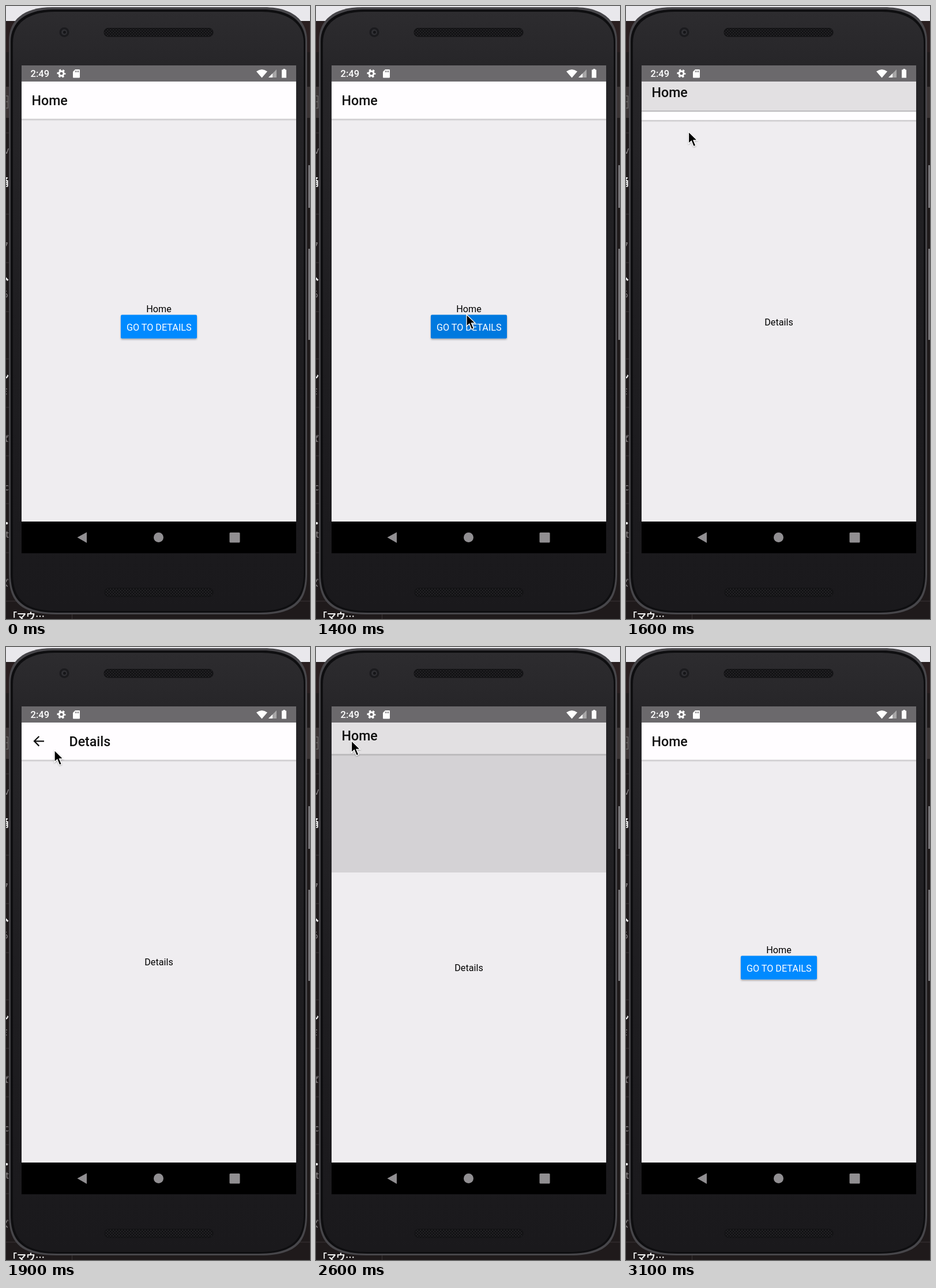
Animation, 527 px wide and 1063 px high, one loop 3500 ms. Source, as an HTML page:

```html
<!DOCTYPE html>
<html lang="en">
<head>
<meta charset="utf-8">
<title>Stack navigation</title>
<style>
html, body { margin: 0; width: 100%; height: 100%; overflow: hidden; background: #1d191a; }
svg { display: block; width: 527px; height: 1063px; font: 16.2px Roboto, sans-serif; }
.title { font-size: 23.2px; font-weight: 500; fill: #111; }
.mid { text-anchor: middle; }
.behind { font-family: "Noto Sans CJK JP", "Noto Sans CJK", sans-serif; fill: #8d898a; }
</style>
</head>
<body>
<svg viewBox="0 0 527 1063">
  <defs>
    <linearGradient id="body" x2="0" y2="1">
      <stop stop-color="#2d2c2f"/><stop offset=".1" stop-color="#262528"/>
      <stop offset=".5" stop-color="#1f1e21"/><stop offset="1" stop-color="#1a191c"/>
    </linearGradient>
    <linearGradient id="shade" x2="0" y2="1">
      <stop stop-color="#000" stop-opacity=".2"/><stop offset="1" stop-color="#000" stop-opacity="0"/>
    </linearGradient>
    <pattern id="mesh" width="5" height="5" patternUnits="userSpaceOnUse">
      <rect width="5" height="5" fill="#121214"/>
      <circle cx="1.2" cy="1.2" r="1" fill="#2c2b2e"/><circle cx="3.7" cy="3.7" r="1" fill="#2c2b2e"/>
    </pattern>
    <filter id="lift" x="-10%" y="-20%" width="120%" height="150%">
      <feDropShadow dx="0" dy="1.8" stdDeviation="1.6" flood-opacity=".32"/>
    </filter>
    <filter id="soft" x="-30%" y="-20%" width="170%" height="150%">
      <feDropShadow dx="0" dy="1" stdDeviation="1" flood-opacity=".35"/>
    </filter>
    <clipPath id="view"><rect x="27" y="131" width="476" height="763"/></clipPath>
    <clipPath id="wipe"><rect id="wipeBox" x="27" y="131" width="476" height="763"/></clipPath>
    <clipPath id="key"><rect x="199" y="535.5" width="132" height="41" rx="2"/></clipPath>
    <g id="page">
      <rect x="27" y="131" width="476" height="763" fill="#efedf0"/>
      <rect x="27" y="195.5" width="476" height="4" fill="url(#shade)"/>
      <rect x="27" y="131" width="476" height="64.5" fill="#fffdff"/>
    </g>
  </defs>

  <!-- desktop behind the phone -->
  <rect width="527" height="1063" fill="#1f1a1b"/>
  <rect width="527" height="26" fill="#e9e8ec"/>
  <path d="M0 27H527V80H0z" fill="#2a1f20"/>
  <path d="M0 140H5V194H0zM522 140H527V194H522z" fill="#3b3535"/>
  <path d="M0 156H4M0 166H4M0 177H4M3.500 156V177" stroke="#777"/>
  <path d="M0 220H6M0 361H6M0 445H6M0 530H6M0 612H6M0 696H6M0 780H6M0 863H6M0 948H6M0 1032H527M114.500 1055V1063" stroke="#3a3536"/>
  <path d="M524 276H527V350H524zM524 421H527V579H524z" fill="#79777a"/>
  <g id="scraps" class="behind"></g>
  <text class="behind" x="3" y="1064" font-size="16" font-weight="700" style="fill:#eee">「マウ…</text>

  <!-- phone -->
  <path d="M5 60C5 25 30 2 80 2H447C497 2 522 25 522 60V985C522 1030 505 1055 440 1055H87C22 1055 5 1030 5 985z" fill="#47464a"/>
  <path d="M8 62C8 28 34 6 82 6H445C493 6 519 28 519 62V984C519 1027 502 1052 438 1052H89C25 1052 8 1027 8 984z" fill="#0e0e10"/>
  <path d="M12 64C12 31 37 10 84 10H443C490 10 516 31 516 64V982C516 1024 500 1049 437 1049H90C27 1049 12 1024 12 982z" fill="url(#body)"/>
  <rect x="170" y="38.500" width="189" height="14.500" rx="7" fill="url(#mesh)" stroke="#111113"/>
  <rect x="171" y="1009.500" width="188" height="14.500" rx="7" fill="url(#mesh)" stroke="#111113"/>
  <circle cx="101" cy="45.500" r="8.500" fill="#1b1b1e"/>
  <circle cx="101" cy="45.500" r="5" fill="#303034"/><circle cx="101.500" cy="45.500" r="2.500" fill="#151518"/>

  <!-- status and navigation bars -->
  <rect x="27" y="103" width="476" height="28" fill="#6b696c"/>
  <g fill="#fff">
    <text x="42.500" y="123" font-size="16.500" font-weight="500">2:49</text>
    <circle cx="96" cy="117" r="4" fill="none" stroke="#fff" stroke-width="3"/>
    <circle cx="96" cy="117" r="6.200" fill="none" stroke="#fff" stroke-width="2.600" stroke-dasharray="3.250 3.243" stroke-dashoffset="1.600"/>
    <path d="M120 110H127Q128 110 128 111V123.500Q128 124.500 127 124.500H117Q116 124.500 116 123.500V114z"/>
    <path d="M120.500 112V115M123 112V115M125.500 112V115" stroke="#6b696c" stroke-width="1.200"/>
    <path d="M434 113.500Q443.500 106.500 453 113.500L443.500 124.500z"/>
    <path d="M469 110V124H455z" opacity=".4"/><path d="M462 117V124H455z"/>
    <path d="M480.500 109H484V110.500H486V124.500H478V110.500H480.500z"/>
  </g>
  <rect x="27" y="894" width="476" height="55"/>
  <g fill="#918f92">
    <path d="M123.500 921.500L140 912.500V931z"/>
    <circle cx="264.500" cy="921.500" r="8.500"/>
    <rect x="387.500" y="913" width="18" height="17.500" rx="1.500"/>
  </g>

  <!-- app -->
  <g clip-path="url(#view)">
    <g id="home">
      <use href="#page"/>
      <text class="title" x="44.500" y="172">Home</text>
      <text class="mid" x="265" y="531">Home</text>
      <rect x="199" y="535.500" width="132" height="41" rx="2" fill="#008aff" filter="url(#lift)"/>
      <circle id="press" cx="289" cy="552" clip-path="url(#key)"/>
      <text class="mid" x="265.300" y="562.500" fill="#fff">GO TO DETAILS</text>
    </g>
    <rect id="dim" x="27" y="131" width="476" height="763"/>
    <g clip-path="url(#wipe)">
      <g id="details">
        <use href="#page"/>
        <circle id="tap" cx="57" cy="163" r="30"/>
        <path d="M66 163.300H49.500M57.300 155L49 163.300L57.300 171.600" fill="none" stroke="#111" stroke-width="2.300"/>
        <text class="title" x="109.500" y="172">Details</text>
        <text class="mid" x="265" y="551.500">Details</text>
      </g>
    </g>
  </g>
  <path id="mouse" d="M0 0V20.500L4.800 16.200L8.600 25.500L12.400 24L8.500 14.800H15z" stroke="#fff" stroke-width="1.300" filter="url(#soft)"/>
</svg>

<script>
const $ = id => document.getElementById(id);
const set = (id, attrs) => { for (const k in attrs) $(id).setAttribute(k, attrs[k]); };
const clamp = v => Math.min(1, Math.max(0, v));
const LOOP = 3500, STEP = 100, SLIDE = 425, TOP = 131, HEIGHT = 763;
const OPEN = 1412, CLOSE = 2532;

// fragments of text at the desktop's left edge: glyph, baseline, size, bold
const scraps = [["v", 256, 16], ["涌", 312, 18, 1], ["ク", 421, 16], ["へ", 477, 18, 1], ["る", 505, 15],
  ["ん", 645, 18, 1], ["ミ", 673, 15], ["ば", 756, 15], ["c", 840, 15], [".", 899, 22, 1], ["t", 922, 15], ["ズ", 1006, 15]];
$("scraps").innerHTML = scraps.map(([s, y, size, bold]) =>
  `<text x="5" y="${y}" text-anchor="end" font-size="${size}"${bold ? ' font-weight="700" fill="#eee" style="fill:#eee"' : ""}>${s}</text>`).join("");

const bezier = (a, b, c, d, u) => {
  const v = 1 - u;
  return v * v * v * a + 3 * v * v * u * b + 3 * v * u * u * c + u * u * u * d;
};

// fast out, extra slow in: two joined curves
function ease(x) {
  if (x <= 0 || x >= 1) return clamp(x);
  const [xs, ys] = x < 1 / 6 ? [[0, .05, .1333, 1 / 6], [0, 0, .06, .4]] : [[1 / 6, .2083, .25, 1], [.4, .82, 1, 1]];
  let lo = 0, hi = 1;
  for (let i = 0; i < 24; i++) {
    const m = (lo + hi) / 2;
    if (bezier(...xs, m) < x) lo = m; else hi = m;
  }
  return bezier(...ys, lo);
}

// pointer path: time, x, y
const path = [[100, 378, 726], [200, 312, 692], [300, 250, 645], [400, 230, 598], [500, 262, 566], [600, 287, 550.5],
  [1300, 287, 550.5], [1400, 261, 535], [1500, 180, 385], [1600, 108.5, 218], [1700, 91, 187], [1900, 84, 179],
  [2000, 61.5, 162.5], [3000, 61.5, 162.5]];

function pointer(t) {
  const i = path.findIndex(p => p[0] >= t);
  if (i < 0 || t < path[0][0]) return null;
  const b = path[i], a = path[i - 1] || b, k = i ? (t - a[0]) / (b[0] - a[0]) : 0;
  return [a[1] + (b[1] - a[1]) * k, a[2] + (b[2] - a[2]) * k];
}

function draw(t) {
  const closing = t >= CLOSE;
  const x = clamp((t - (closing ? CLOSE : OPEN)) / SLIDE);
  const shown = closing ? 1 - ease(x) : ease(x);
  const drop = .041 * HEIGHT * (1 - shown);
  const cut = .959 * HEIGHT * (1 - shown) + drop;
  const dim = closing ? 1 - x * x : clamp((t - OPEN) / 117);

  set("home", { transform: `translate(0 ${-.02 * HEIGHT * shown})` });
  set("details", { transform: `translate(0 ${drop})` });
  set("wipeBox", { y: TOP + cut, height: Math.max(0, HEIGHT - cut) });
  set("dim", { opacity: .115 * dim });

  const press = closing ? 0 : clamp((t - 800) / 500);
  set("press", { r: 110 * press, opacity: .125 * clamp(press * 2) });
  const tap = clamp((t - 2000) / 300) * clamp((2600 - t) / 200);
  set("tap", { opacity: .14 * tap });

  const at = pointer(t);
  set("mouse", { visibility: at ? "visible" : "hidden", transform: `translate(${at || "0 0"})` });
}

const start = performance.now();
function tick() {
  const t = (performance.now() - start) % LOOP;
  draw(Math.floor(t / STEP) * STEP);
  requestAnimationFrame(tick);
}
tick();
</script>
</body>
</html>
```
